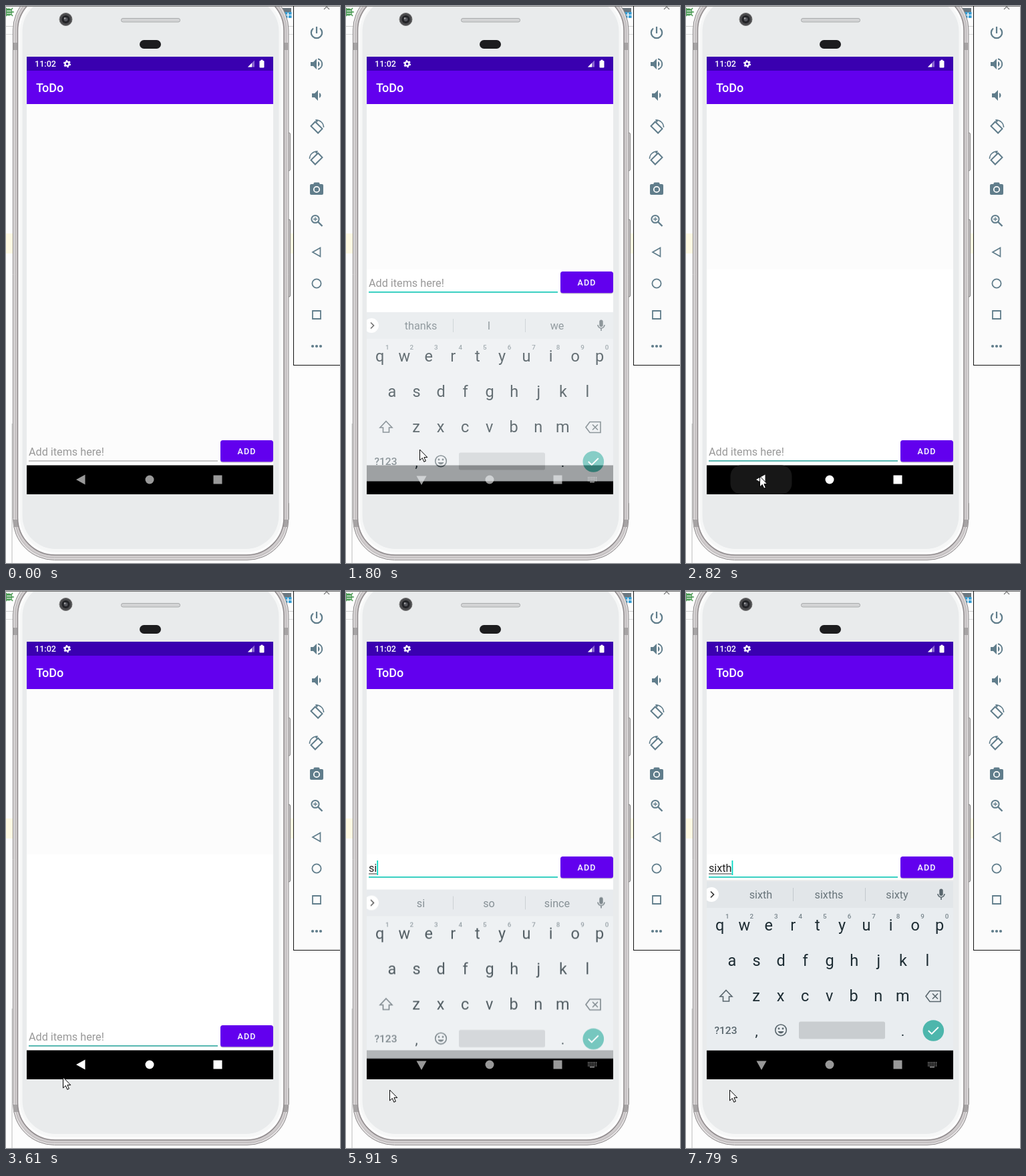
These frames come from a looping animation (500 by 835 pixels, 8000 ms). An HTML page with a canvas:

```html
<!DOCTYPE html>
<html lang="en">
<head>
<meta charset="utf-8">
<title>ToDo app in a phone emulator</title>
<style>
html, body { margin: 0; width: 100%; height: 100%; overflow: hidden; background: #fdfdfd; }
canvas { display: block; }
</style>
</head>
<body>
<canvas id="stage" width="500" height="835"></canvas>
<script>
const stage = document.getElementById('stage').getContext('2d');
let ctx = stage; // surface the helpers paint on
const LOOP = 8000;
const PURPLE = '#6200ee', SLATE = '#607d8b', INK = '#1d2c33', KEY_GREY = '#59666d';

// Each entry is [start time, value]; the value holds until the next entry.
const pointerSteps = [[0, null], [500, [101.5, 687]], [620, [110.5, 673]], [770, [110.5, 670]],
  [1020, [110.5, 665]], [2160, [110.5, 685]], [2280, [110.5, 702]], [2430, [110.5, 705]],
  [3610, [85.5, 729]], [3730, [65.5, 748]]];
// Keyboard: [offset, opacity]
const keyboardSteps = [[0, null], [1680, [30, .55]], [1800, [24, .68]], [1920, [0, 1]],
  [2700, [12, .6]], [2820, null], [5790, [30, .55]], [5910, [12.5, .77]], [6060, [3, .95]], [6180, [0, 1]]];
const fieldSteps = [[0, 0], [1680, -253], [2820, 0], [5790, -253]];
const focusSteps = [[0, 0], [1170, .5], [1290, 1]];
const caretSteps = [[0, 0], [1170, 1], [1680, 0], [2160, 1], [2700, 0], [3240, 1], [3610, 0],
  [4230, 1], [4760, 0], [5250, 1], [7260, 0], [7790, 1]];
const typedSteps = [[0, ''], [5650, 's'], [5910, 'si'], [6060, 'six'], [6580, 'sixt'], [6700, 'sixth']];
const suggestionSteps = [[0, 'thanks I we'], [2430, ''], [5790, 's so is'], [5910, 'si so since'],
  [6060, 'six sixth sixty'], [6580, 'sixt sixty sixth'], [6700, 'sixth sixths sixty']];
const navSteps = [[0, '#999'], [2820, '#fff'], [5010, '#f4f4f4'], [5250, '#ddd'], [5380, '#c8c8c8'],
  [5500, '#b0b0b0'], [5650, '#999']];
// Ripple around the back button: [half width, grey]
const rippleSteps = [[0, null], [2550, [16.5, '#1c1c1c']], [2700, [34, '#1c1c1c']],
  [2820, [46, '#171717']], [2940, null]];

const valueAt = (steps, t) => steps.filter(([start]) => start <= t).pop()[1];

function paint(fill, stroke, width, path) {
  const target = path ? [path] : [];
  if (fill) { ctx.fillStyle = fill; ctx.fill(...target); }
  if (stroke) { ctx.strokeStyle = stroke; ctx.lineWidth = width; ctx.stroke(...target); }
}
function rect(x, y, w, h, fill) {
  ctx.fillStyle = fill;
  ctx.fillRect(x, y, w, h);
}
function round(x, y, w, h, r, fill, stroke, width = 1) {
  ctx.beginPath();
  ctx.roundRect(x, y, w, h, r);
  paint(fill, stroke, width);
}
function circle(x, y, r, fill, stroke, width = 1) {
  ctx.beginPath();
  ctx.arc(x, y, r, 0, Math.PI * 2);
  paint(fill, stroke, width);
}
// Path in coordinates relative to (x, y)
function shape(x, y, d, fill, stroke, width = 1, angle = 0) {
  ctx.save();
  ctx.translate(x, y);
  ctx.rotate(angle);
  paint(fill, stroke, width, new Path2D(d));
  ctx.restore();
}
function text(str, x, y, size, color, { weight = 400, align = 'left', spacing = 0 } = {}) {
  ctx.font = `${weight} ${size}px Roboto, sans-serif`;
  ctx.textAlign = align;
  ctx.letterSpacing = spacing + 'px';
  ctx.fillStyle = color;
  ctx.fillText(str, x, y);
}

// Paints with the helpers onto a separate transparent surface.
function layer(draw) {
  const canvas = document.createElement('canvas');
  canvas.width = 500;
  canvas.height = 835;
  ctx = canvas.getContext('2d');
  draw();
  ctx = stage;
  return canvas;
}

function drawBackdrop() {
  rect(0, 0, 500, 835, '#fdfdfd');
  rect(0, 30, 431, 1, '#cfcfcf');
  rect(0, 42, 431, 1, '#dcdcdc');
  rect(0, 341, 431, 30, '#fffae3');
  rect(8.5, 626, 1, 209, '#bbb');
  circle(4, 9, 5.5, '#4f9d58');
  shape(4, 9, 'M-4-6L6 6M6-6L-4 6M-4 0H8', null, '#4f9d58', 1.6);
  shape(4, 9, 'M-3-1.5H4M-3 2H4', null, '#fff', 1);
  rect(413, 3, 14, 7, '#6c7880');
  for (const [x, y] of [[417, 9], [423, 9], [417, 14], [423, 14]]) rect(x, y, 4.5, 4, '#389fd6');
}

function drawPhone() {
  round(421, 190, 4.5, 57, 2, '#d2cfd0', '#8c898a');
  round(421, 320, 4.5, 116, 2, '#d2cfd0', '#777');
  round(420, 745, 3.5, 25, 1, '#ccc', '#aaa');
  round(10.5, -26, 412.5, 856.5, 62, '#e2dfe0', '#8a8788');
  round(13.5, -23, 406.5, 850.5, 59, '#d0cccd', '#b5b1b2');
  for (const y of [55, 770]) {
    rect(11, y, 8, 11, '#a6a3a4');
    rect(414, y, 8, 11, '#a6a3a4');
  }
  round(17.5, -19, 398.5, 842, 56, '#f9f9f9', '#8f8a8c', 1.5);
  round(20, -16, 393.5, 836, 54, '#f6f7f7', '#fff', 2);
  round(24.5, -12, 384, 826, 50, '#e9ebec');
  rect(0, 0, 431, 1, '#777');

  circle(89.5, 20, 9.5, '#4a4a4c', '#777');
  circle(89.5, 20, 6, '#222326');
  circle(89.5, 20, 3, '#55565c');
  circle(88, 18.5, 1.2, '#aaa');
  round(172.5, 18.5, 88, 5.5, 2.5, '#d3d4d5', '#a9abac');
  round(200, 51, 32, 13, 6.5, '#1c1c1e');
}

function drawEmulatorPanel() {
  rect(431, 0, 69, 538, '#fbfbfb');
  rect(430, 0, 1, 539, '#111');
  rect(430, 538, 70, 1, '#111');
  rect(431, 0, 69, 1, '#777');
  shape(450, 0, 'M-5 .5H5', null, '#777', 1);
  shape(480, 1, 'M-4-4L4 4M4-4L-4 4', null, '#777', 1.2);

  const stroke = (y, d, width = 2) => shape(465, y, d, null, SLATE, width);
  const fill = (y, d) => shape(465, y, d, SLATE);
  const speaker = 'v6h4l5 5v-16l-5 5z';
  stroke(40, 'M0-9V1M-5-6.5A8.2 8.2 0 1 0 5-6.5', 2.2);
  fill(87, 'M-9-3' + speaker);
  fill(87, 'M2-4A4.4 4.4 0 0 1 2 4z');
  stroke(87, 'M2-7.8A8 8 0 0 1 2 7.8');
  fill(134, 'M-7-3' + speaker);
  fill(134, 'M4-4A4.4 4.4 0 0 1 4 4z');
  for (const [y, flip] of [[181, 1], [228, -1]]) {
    ctx.save();
    ctx.translate(465, y);
    ctx.scale(flip, 1);
    shape(0, 1, 'M-4.5-7.5H4.5V7.5H-4.5Z', null, SLATE, 2, -Math.PI / 4);
    shape(0, 0, 'M-1-10A11 11 0 0 1 10.5 1', null, SLATE, 1.6);
    shape(0, 0, 'M-2-11L3-10L0-6Z', SLATE);
    ctx.restore();
  }
  round(455, 267, 20, 16, 2, SLATE);
  round(460.5, 264.5, 9, 5, 1.5, SLATE);
  circle(465, 275, 4.2, SLATE, '#fbfbfb', 1.8);
  circle(463, 319.5, 5.6, null, SLATE, 2);
  stroke(321, 'M2 2.5L8.5 9', 2.4);
  shape(463, 319.5, 'M-3 0H3M0-3V3', null, SLATE, 1.3);
  stroke(369, 'M5.5-6.5V6.5L-6 0Z', 1.7);
  circle(465, 416, 6.6, null, SLATE, 1.8);
  stroke(463, 'M-6-6H6V6H-6Z', 1.8);
  for (const dx of [-6, 0, 6]) circle(465 + dx, 510, 2.1, SLATE);
}

function drawAppBars() {
  rect(31, 76, 369, 656, '#fcfcfc');
  rect(31, 76, 369, 21, '#3a00b0');
  rect(31, 97, 369, 50, PURPLE);
  text('11:02', 43, 91.3, 12.6, '#fff', { weight: 500 });
  text('ToDo', 45, 129.3, 18, '#fff', { weight: 500 });
  ctx.setLineDash([2.3, 2.3]);
  circle(91.5, 86.7, 4.4, null, '#fff', 2.4);
  ctx.setLineDash([]);
  circle(91.5, 86.7, 3, null, '#fff', 2.2);
  shape(362, 91.5, 'M0 0H10V-10Z', '#8a66d2');
  shape(362, 91.5, 'M0 0H6V-6Z', '#fff');
  round(379.5, 82, 7, 10.5, 1, '#fff');
  rect(381.5, 80.7, 3, 2, '#fff');
}

function drawField(t) {
  const dy = valueAt(fieldSteps, t), focus = valueAt(focusSteps, t), typed = valueAt(typedSteps, t);
  if (t >= 1680) rect(31, 395, 369, 294, '#fff');
  ctx.save();
  ctx.translate(0, dy);
  rect(34, 681.5, 283, 1, '#8f8f8f');
  if (focus) rect(34 + 141 * (1 - focus), 681, 283 * focus, 1.7, dy ? '#22d3c2' : '#45b5ad');
  text(typed || 'Add items here!', 34, 674.3, 16.2, typed ? '#222' : '#999');
  const end = 34 + (typed ? ctx.measureText(typed).width : 0);
  if (typed) rect(34, 676.5, end - 34, 1, '#333');
  if (valueAt(caretSteps, t)) rect(end, 657, 1.8, 22, '#03dac5');
  round(321, 652.5, 79, 32, 3.5, '#c4c0ca');
  round(321, 651, 79, 32.3, 3.5, PURPLE);
  text('ADD', 346.5, 671.6, 12.5, '#fff', { weight: 500, spacing: 1.1 });
  ctx.restore();
}

function drawNav(t, keyboardOpen) {
  const color = valueAt(navSteps, t), ripple = valueAt(rippleSteps, t);
  rect(31, 688.5, 369, 43.5, '#000');
  if (ripple) round(112.5 - ripple[0], 688.5, ripple[0] * 2, 43.5, 16, ripple[1]);
  if (keyboardOpen) {
    shape(113, 711, 'M-7.5-6.5H7.5L0 7Z', color);
    for (let row = 0; row < 3; row++)
      for (let col = 0; col < 6; col++) rect(362 + col * 2.4, 706 + row * 2.5, 1.4, 1.4, color);
    rect(365, 713, 7, 1.4, color);
  } else {
    shape(112, 710, 'M6.5-7.5V7.5L-7 0Z', color);
  }
  circle(215, 710, 6.5, color);
  rect(310.5, 703.5, 13, 13, color);
}

function drawKeys() {
  rect(31, 435, 369, 253.5, '#e9edf0');
  rect(31, 435, 369, 40, '#e2e6e9');
  ctx.save();
  ctx.beginPath();
  ctx.rect(31, 435, 369, 254);
  ctx.clip();
  circle(38, 455, 11, '#fff');
  ctx.restore();
  shape(39.5, 455, 'M-2.5-4.5L2 0L-2.5 4.5', null, '#333', 1.7);
  round(379.3, 446.5, 5.4, 10.5, 2.7, KEY_GREY);
  shape(382, 455, 'M-5-1A5 5 0 0 0 5-1M0 4V8', null, KEY_GREY, 1.6);

  ['qwertyuiop', 'asdfghjkl', 'zxcvbnm'].forEach((row, r) => [...row].forEach((key, i) => {
    const x = [50.7, 69, 105][r] + i * 36.55;
    text(key, x, 509 + r * 53.2, 23.5, INK, { align: 'center' });
    if (r === 0) text((i + 1) % 10, x + 11, 491, 9.8, '#78858c', { align: 'center', weight: 500 });
  }));
  shape(60, 607, 'M0-8.5L9 1H4.5V8H-4.5V1H-9Z', null, KEY_GREY, 1.6);
  shape(370, 607.5, 'M-5-8H11V8H-5L-11 0Z', null, KEY_GREY, 1.6);
  shape(373, 607.5, 'M-4-4L4 4M4-4L-4 4', null, KEY_GREY, 1.6);

  text('?123', 59.5, 664.2, 15.5, KEY_GREY, { align: 'center', weight: 500 });
  text(',', 105.5, 667, 21, INK, { align: 'center' });
  text('.', 324.5, 667, 21, INK, { align: 'center' });
  circle(142, 658.3, 8.3, null, KEY_GREY, 1.6);
  circle(139, 656, 1.4, KEY_GREY);
  circle(145, 656, 1.4, KEY_GREY);
  shape(142, 660, 'M-4.5 0A4.8 4.8 0 0 0 4.5 0Z', KEY_GREY);
  round(169, 645.5, 129, 26, 2.5, '#c9cdd0');
  circle(370.3, 659, 15.8, '#4db6ac');
  shape(370.3, 659, 'M-7.5 0L-2.5 5L7.5-5', null, '#fff', 1.9);
}

function drawSuggestions(words) {
  if (!words) return;
  words.split(' ').forEach((word, i) =>
    text(word, 112 + i * 102, 461.3, 16.2, '#69757b', { align: 'center' }));
  rect(160, 445, 1, 20, '#c3c9cd');
  rect(268, 445, 1, 20, '#c3c9cd');
}

function drawKeyboard([offset, opacity], words) {
  ctx.save();
  ctx.globalAlpha = opacity;
  ctx.translate(0, offset);
  if (opacity === 1) rect(31, 433, 369, 2, '#ececec');
  ctx.drawImage(keys, 0, 0);
  drawSuggestions(words);
  ctx.restore();
}

function drawPointer([x, y]) {
  shape(x, y, 'M0 0V16L3.8 12.5L6.3 18.3L8.9 17.1L6.4 11.6H11.3Z', '#fff', '#000', 1);
}

const keys = layer(drawKeys);
const scenery = layer(() => {
  drawBackdrop();
  drawPhone();
  drawEmulatorPanel();
  drawAppBars();
});

function render(now) {
  const t = now % LOOP;
  const keyboard = valueAt(keyboardSteps, t), pointer = valueAt(pointerSteps, t);
  ctx.drawImage(scenery, 0, 0);
  drawField(t);
  drawNav(t, keyboard);
  if (keyboard) drawKeyboard(keyboard, valueAt(suggestionSteps, t));
  if (pointer) drawPointer(pointer);
}

const start = performance.now();
function tick() {
  render(performance.now() - start);
  requestAnimationFrame(tick);
}
tick();
</script>
</body>
</html>
```
